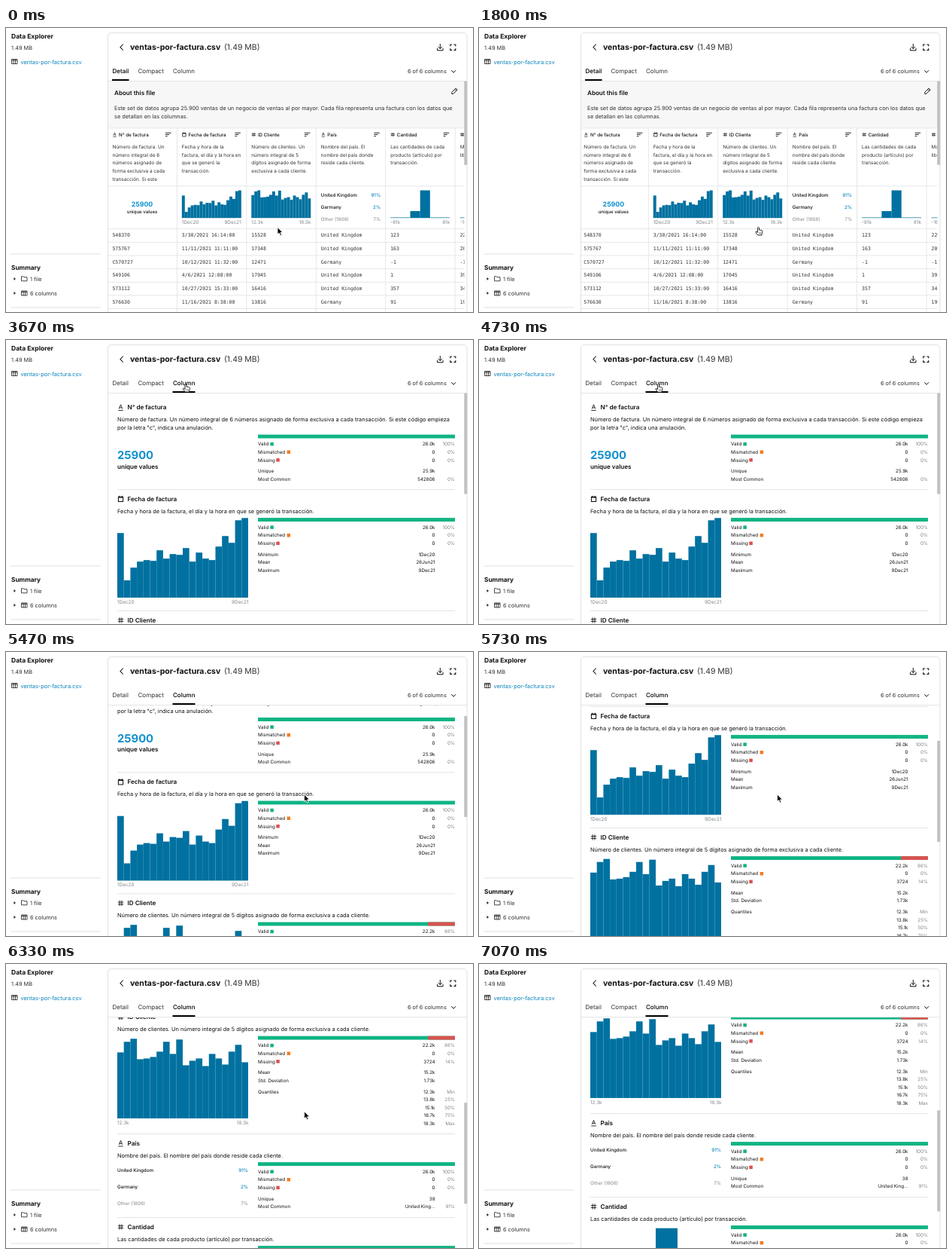
Animation, 621 px wide and 377 px high, one loop 7.34 s. Source, as an HTML page with a canvas:

```html
<!DOCTYPE html>
<html lang="es">
<head>
<meta charset="utf-8">
<title>Data Explorer</title>
<style>
html, body { margin: 0; width: 100%; height: 100%; overflow: hidden; background: #fff; }
canvas { display: block; width: 621px; height: 377px; }
</style>
</head>
<body>
<canvas id="stage"></canvas>
<script>
const W = 621, H = 377, LOOP = 7340, STEP = 1000 / 15;
const SANS = 'Inter, "Open Sans", sans-serif';
const MONO = '"Roboto Mono", "DejaVu Sans Mono", "Noto Sans Mono", monospace';
const INK = '#101113', SOFT = '#2f3235', GRAY = '#80868b', LINE = '#dfe1e5', BLUE = '#0071a0', LINK = '#0a84bd',
  GREEN = '#10b484', ORANGE = '#f27c22', RED = '#d9534f';

const canvas = document.getElementById('stage');
const ctx = canvas.getContext('2d');
const dpr = window.devicePixelRatio || 1;
canvas.width = W * dpr;
canvas.height = H * dpr;

const DATES = [86, 23, 40, 48, 50, 49, 63, 52, 58, 57, 66, 48, 60, 52, 50, 68, 82, 73, 103, 106];
const CLIENTS = [87, 101, 105, 78, 79, 81, 88, 101, 85, 104, 70, 76, 79, 69, 85, 79, 71, 88, 97, 74];
const QUANTITIES = [0, 0, 26, 106, 0, 0];
const AMOUNTS = [0, 0, 0, 0, 17, 106, 0, 0, 0, 0, 0];
const COUNTRIES = [['United Kingdom', '91%'], ['Germany', '2%'], ['Other (1808)', '7%']];

const COLUMNS = [
  { name: 'N° de factura', icon: letterIcon,
    about: ['Número de factura. Un', 'número integral de 6', 'números asignado de', 'forma exclusiva a cada', 'transacción. Si este'],
    cells: ['548370', '575767', 'C570727', '549106', '573112', '576630'] },
  { name: 'Fecha de factura', icon: dateIcon, bars: DATES, ends: ['1Dec20', '9Dec21'],
    about: ['Fecha y hora de la', 'factura, el día y la hora en', 'que se generó la', 'transacción.'],
    cells: ['3/30/2021 16:14:00', '11/11/2021 11:11:00', '10/12/2021 11:32:00', '4/6/2021 12:08:00', '10/27/2021 15:33:00', '11/16/2021 8:38:00'] },
  { name: 'ID Cliente', icon: hashIcon, bars: CLIENTS, ends: ['12.3k', '18.3k'],
    about: ['Número de clientes. Un', 'número integral de 5', 'dígitos asignado de forma', 'exclusiva a cada cliente.'],
    cells: ['15528', '17348', '12471', '17045', '16416', '13816'] },
  { name: 'País', icon: letterIcon, list: COUNTRIES,
    about: ['Nombre del país. El', 'nombre del país donde', 'reside cada cliente.'],
    cells: ['United Kingdom', 'United Kingdom', 'Germany', 'United Kingdom', 'United Kingdom', 'Germany'] },
  { name: 'Cantidad', icon: hashIcon, bars: QUANTITIES, ends: ['-81k', '81k'],
    about: ['Las cantidades de cada', 'producto (artículo) por', 'transacción.'],
    cells: ['123', '163', '-1', '1', '357', '91'] },
  { name: 'Monto', icon: hashIcon, bars: AMOUNTS, ends: ['-168k', '168k'],
    about: ['Monto de la factura en', 'libras esterlinas.'],
    cells: ['229.33', '209.73', '-1.45', '39.95', '344.83', '199.98'] }
];

// chart: offset of the histogram base; sections with quantiles are taller
const FULL = ['26.0k', '100%', '0', '0%', '0', '0%'];
const SECTIONS = [
  { y: 89.5, col: 0, valid: FULL,
    about: ['Número de factura. Un número integral de 6 números asignado de forma exclusiva a cada transacción. Si este código empieza', 'por la letra "c", indica una anulación.'],
    stats: [['Unique', '25.9k'], ['Most Common', '542806', '0%']] },
  { y: 211, col: 1, valid: FULL, chart: 131,
    about: ['Fecha y hora de la factura, el día y la hora en que se generó la transacción.'],
    stats: [['Minimum', '1Dec20'], ['Mean', '26Jun21'], ['Maximum', '9Dec21']] },
  { y: 372, col: 2, valid: ['22.2k', '86%', '0', '0%', '3724', '14%'], missing: 0.137, chart: 134.4,
    about: ['Número de clientes. Un número integral de 5 dígitos asignado de forma exclusiva a cada cliente.'],
    stats: [['Mean', '15.2k'], ['Std. Deviation', '1.73k'], null, ['Quantiles', '12.3k', 'Min'], ['', '13.8k', '25%'],
      ['', '15.1k', '50%'], ['', '16.7k', '75%'], ['', '18.3k', 'Max']] },
  { y: 539.5, col: 3, valid: FULL,
    about: ['Nombre del país. El nombre del país donde reside cada cliente.'],
    stats: [['Unique', '38'], ['Most Common', 'United King...', '91%']] },
  { y: 650.5, col: 4, valid: FULL, chart: 134.4,
    about: ['Las cantidades de cada producto (artículo) por transacción.'], stats: [] }
];

// [time, value...] points joined by monotone curves
const CURSOR = [[0, 361, 264.5], [70, 361, 264.5], [800, 371.5, 264], [2640, 371.5, 264], [3400, 239, 58],
  [4000, 239, 58], [4330, 237, 57], [4700, 237, 57], [5220, 396.5, 189], [6270, 396.5, 189], [6800, 400, 380], [LOOP, 400, 380]];
const TABLE_SCROLL = [[1750, 0], [2270, 81.3]];
const PAGE_SCROLL = [[5250, 0], [5730, 126], [6070, 249], [6400, 308], [7000, 328.5]];

function track(keys, t, k = 1) {
  const last = keys.length - 1;
  if (t <= keys[0][0]) return keys[0][k];
  if (t >= keys[last][0]) return keys[last][k];
  const i = keys.findIndex(p => p[0] > t) - 1;
  const slope = j => j < 0 || j >= last ? 0 : (keys[j + 1][k] - keys[j][k]) / (keys[j + 1][0] - keys[j][0]);
  const tangent = j => {
    const a = slope(j - 1), b = slope(j);
    return a * b > 0 ? 2 * a * b / (a + b) : 0;
  };
  const d = keys[i + 1][0] - keys[i][0], u = (t - keys[i][0]) / d, v = 1 - u;
  return keys[i][k] * v * v * (1 + 2 * u) + keys[i + 1][k] * u * u * (3 - 2 * u) +
    d * u * v * (v * tangent(i) - u * tangent(i + 1));
}

function text(str, x, y, size, { weight = 400, color = INK, align = 'left', font = SANS } = {}) {
  ctx.font = `${weight} ${size}px ${font}`;
  ctx.fillStyle = color;
  ctx.textAlign = align;
  ctx.fillText(str, x, y + size * 0.36);
}

function rect(x, y, w, h, color) {
  ctx.fillStyle = color;
  ctx.fillRect(x, y, w, h);
}

function stroke(d, x, y, color = INK, width = 1, scale = 1) {
  ctx.save();
  ctx.translate(x, y);
  ctx.scale(scale, scale);
  ctx.strokeStyle = color;
  ctx.lineWidth = width;
  ctx.stroke(new Path2D(d));
  ctx.restore();
}

function fill(d, x, y, color, outline) {
  const path = new Path2D(d);
  ctx.save();
  ctx.translate(x, y);
  ctx.lineJoin = 'round';
  ctx.fillStyle = color;
  ctx.fill(path);
  if (outline) {
    ctx.strokeStyle = outline;
    ctx.lineWidth = 0.9;
    ctx.stroke(path);
  }
  ctx.restore();
}

function clipped(x, y, w, h, draw) {
  ctx.save();
  ctx.beginPath();
  ctx.rect(x, y, w, h);
  ctx.clip();
  draw();
  ctx.restore();
}

function letterIcon(x, y, s) {
  stroke('M-2 1.6L0 -3.2L2 1.6M-1.3 0.3H1.3M-2.8 3.4H2.8', x, y, INK, 0.75, s);
}

function dateIcon(x, y, s) {
  stroke('M-2.7 -2.4H2.7V3H-2.7ZM-2.7 -1.7H2.7M-1.5 -3.6V-2M1.5 -3.6V-2', x, y, INK, 0.9, s);
}

function hashIcon(x, y, s) {
  stroke('M-3.2 -1.2H3.2M-3.2 1.2H3.2M-1.2 -3.2V3.2M1.2 -3.2V3.2', x, y, INK, 0.75, s);
}

function gridIcon(x, y) {
  stroke('M0.5 0.5H8V6.5H0.5ZM0.5 2H8M3 0.5V6.5M5.5 0.5V6.5', x, y, SOFT, 0.9);
}

function histogram(bars, x, bottom, w, h) {
  const step = w / bars.length, top = Math.max(...bars);
  bars.forEach((n, i) => rect(x + i * step, bottom - n / top * h, step, n / top * h, BLUE));
}

function countryList(list, left, right, y, gap) {
  list.forEach(([name, share], i) => {
    const other = i === 2, weight = other ? 400 : 500;
    text(name, left, y + i * gap, 6.25, { weight, color: other ? GRAY : INK });
    text(share, right, y + i * gap, 6.25, { weight, color: other ? GRAY : LINK, align: 'right' });
  });
}

function drawSidebar() {
  text('Data Explorer', 7, 11, 8.5, { weight: 700 });
  text('1.49 MB', 7, 26, 7.4, { color: SOFT });
  gridIcon(7, 41);
  text('ventas-por-factura.csv', 19.5, 45, 7.45, { color: LINK });
  rect(6, 299.5, 120, 1, LINE);
  text('Summary', 7, 318, 8.3, { weight: 700 });
  for (const y of [333, 352]) fill('M0 -2L2.4 0L0 2Z', 10.5, y, INK);
  stroke('M0.5 0.8H3.2L4 1.8H8V6.8H0.5Z', 20, 329, SOFT, 0.9);
  text('1 file', 32, 333, 7.35, { color: SOFT });
  gridIcon(20, 348.5);
  text('6 columns', 32, 352.5, 7.35, { color: SOFT });
  rect(6, 370.5, 120, 1, LINE);
}

function drawFrame(active) {
  stroke('M135.5 377V10.5Q135.5 6.5 139.5 6.5H609Q613 6.5 613 10.5V377', 0, 0, LINE);
  stroke('M155.7 21.5L152 25.5L155.7 29.5', 0, 0, INK, 1.1);
  text('ventas-por-factura.csv', 165, 25.5, 10.5, { weight: 700 });
  text('(1.49 MB)', 290, 25.5, 10.5, { color: SOFT });
  stroke('M577.3 21V27.3M574.6 24.8L577.3 27.5L580 24.8M573.6 26.8V29.8H581V26.8', 0, 0, INK, 1);
  stroke('M590.8 24.3V22H593.2M595.4 22H597.8V24.3M597.8 27V29.4H595.4M593.2 29.4H590.8V27', 0, 0, INK, 1.1);
  [['Detail', 141.5, 22], ['Compact', 175.5, 34], ['Column', 222, 29.5]].forEach(([name, x, w]) => {
    const on = name === active;
    text(name, x, 57.5, 8, { weight: on ? 500 : 400, color: on ? '#000' : SOFT });
    if (on) rect(x - 0.5, 68, w + 0.5, 2, '#000');
  });
  text('6 of 6 columns', 534, 57.5, 7.35, { color: SOFT });
  stroke('M592.3 56.2L595.2 59.2L598.1 56.2', 0, 0, INK, 1);
}

function drawColumn(col, x) {
  const left = x + 6.4;
  col.icon(x + 9.5, 141.5, 0.82);
  text(col.name, x + 15, 141.5, 6.25, { weight: 500 });
  stroke('M0 0H7.5M0 2.2H5M0 4.4H2.6', x + 77, 139.3, INK, 0.9);
  col.about.forEach((s, i) => text(s, left, 157.8 + i * 10.6, 6.43, { color: SOFT }));
  if (col.bars) {
    histogram(col.bars, left, 252, 79, 36.5);
    rect(left, 251.5, 79, 0.7, BLUE);
    text(col.ends[0], left, 257.8, 6.4, { color: GRAY });
    text(col.ends[1], left + 79, 257.8, 6.4, { color: GRAY, align: 'right' });
  } else if (col.list) {
    countryList(col.list, left, x + 85.8, 222, 16);
  } else {
    text('25900', x + 46, 234, 8.8, { weight: 700, color: '#1090cf', align: 'center' });
    text('unique values', x + 46, 243.5, 6.1, { weight: 500, align: 'center' });
  }
  col.cells.forEach((s, i) => text(s, left, 275 + i * 17.65, 6.5, { font: MONO, color: SOFT }));
  rect(x + 92, 133, 0.8, 244, LINE);
}

function drawDetail(scroll) {
  rect(136, 71, 473.5, 61.5, '#f7f7f7');
  text('About this file', 144, 86, 8.1, { weight: 600 });
  stroke('M592.8 87.4V85.4L598.2 80L600.2 82L594.8 87.4ZM596.8 81.4L598.8 83.4', 0, 0, INK, 1);
  text('Este set de datos agrupa 25.900 ventas de un negocio de ventas al por mayor. Cada fila representa una factura con los datos que', 144, 106, 7.35, { color: SOFT });
  text('se detallan en las columnas.', 144, 117.5, 7.35, { color: SOFT });
  clipped(136, 132, 473.5, 245, () => {
    for (const y of [132.5, 209.5, 266.3]) rect(135, y, 475, 0.8, LINE);
    for (let i = 1; i < 7; i++) rect(135, 266.3 + i * 17.65, 475, 0.8, LINE);
    COLUMNS.forEach((col, i) => drawColumn(col, 135 + i * 92.45 - scroll));
  });
  rect(609.3, 70.7, 4, 111, '#c1c1c1');
}

function drawSection(sec, y) {
  const col = COLUMNS[sec.col], bar = y + 16.5 + sec.about.length * 11, right = { align: 'right' };
  col.icon(152.5, y, 1.15);
  text(col.name, 161.5, y, 8.15, { weight: 600 });
  sec.about.forEach((s, i) => text(s, 148, y + 16.2 + i * 11, 7.4));
  rect(335, bar - 2.4, 262, 4.9, GREEN);
  if (sec.missing) rect(597 - 262 * sec.missing, bar - 2.4, 262 * sec.missing, 4.9, RED);

  [['Valid', 351.4, GREEN], ['Mismatched', 373.6, ORANGE], ['Missing', 359.3, RED]].forEach(([name, x, color], i) => {
    const row = bar + 10.1 + i * 10.6;
    text(name, 335, row, 6.25);
    rect(x, row - 2.2, 4.5, 4.5, color);
    text(sec.valid[i * 2], 570.5, row, 6.25, right);
    text(sec.valid[i * 2 + 1], 597, row, 6.25, { ...right, color: GRAY });
  });
  let row = bar + 45.8;
  for (const stat of sec.stats) {
    if (stat) {
      const [name, value, share = ''] = stat;
      text(name, 335, row, 6.25);
      text(value, 570.5, row, 6.25, right);
      text(share, 597, row, 6.25, { ...right, color: GRAY });
    }
    row += stat ? 10.6 : 4.4;
  }

  if (col.bars) {
    const base = y + sec.chart;
    histogram(col.bars, 148, base, 174, 105.7);
    text(col.ends[0], 148, base + 5.3, 6.4, { color: GRAY });
    text(col.ends[1], 322.5, base + 5.3, 6.4, { ...right, color: GRAY });
  } else if (col.list) {
    countryList(col.list, 148, 322, y + 35.8, 21.8);
  } else {
    text('25900', 148, y + 63.5, 14.8, { weight: 700, color: '#1090cf' });
    text('unique values', 148, y + 78.5, 8.1, { weight: 600 });
  }
}

function drawColumnPage(scroll) {
  clipped(136, 71, 473, 306, () => {
    SECTIONS.forEach((sec, i) => {
      drawSection(sec, sec.y - scroll);
      if (i) rect(148, sec.y - scroll - 13, 449, 0.9, LINE);
    });
  });
  rect(609.3, 70.5 + scroll * 0.377, 4, 134, '#c1c1c1');
}

function drawCursor(t) {
  const x = track(CURSOR, t), y = track(CURSOR, t, 2);
  const hand = t > 600 && t < 2850 || t > 3250 && t < 4800;
  if (hand) {
    fill('M-1 1Q0 -0.6 1 1V4.2L2.2 4L3.4 4.4L4.6 4.8Q5.6 5 5.5 6.4L4.6 9.2V11H-0.8L-3.4 7.4Q-4 6 -2.6 6.2L-1 7.4Z', x, y, '#fff', '#111');
    stroke('M1.2 7.2V9.4M2.9 7.2V9.4', x, y, '#111', 0.6);
  } else {
    fill('M0 0V9.6L2.2 7.6L3.8 11.2L5.5 10.4L4 7H7Z', x, y, '#000', '#fff');
  }
}

// The picture is held between steps of 15 per second, on a 10 ms grid.
function held(t) {
  return Math.round(Math.floor(t / STEP + 0.1) * STEP / 10) * 10;
}

function render(now) {
  const t = held(now % LOOP);
  ctx.setTransform(dpr, 0, 0, dpr, 0, 0);
  ctx.textRendering = 'geometricPrecision';
  rect(0, 0, W, H, '#fff');
  const detail = t < 3600;
  drawSidebar();
  rect(136, 70, 477, 0.9, LINE);
  drawFrame(detail ? 'Detail' : 'Column');
  if (detail) drawDetail(track(TABLE_SCROLL, t));
  else drawColumnPage(track(PAGE_SCROLL, t));
  drawCursor(t);
}

const start = performance.now();
function tick() {
  render(performance.now() - start);
  requestAnimationFrame(tick);
}
tick();
</script>
</body>
</html>
```
